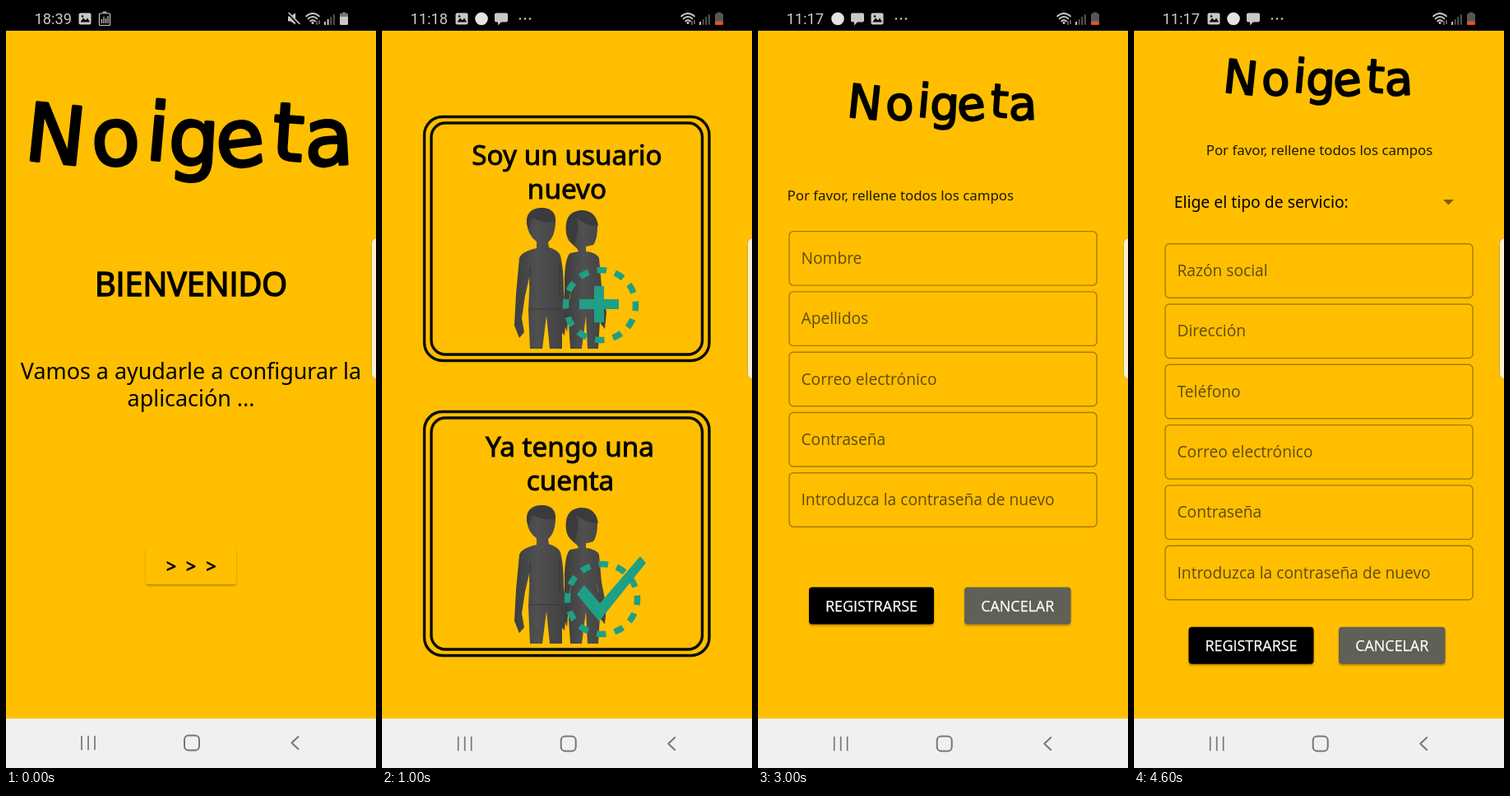
An HTML page that plays this animation: 450 by 925 pixels, repeating every 5 s.

```html
<!DOCTYPE html>
<html lang="es">
<head>
<meta charset="utf-8">
<title>Noigeta</title>
<style>
  html, body { margin: 0; width: 100%; height: 100%; overflow: hidden; background: #ffbf00; }
  svg { display: block; width: 100%; height: 100%; }
  text { font-family: "Noto Sans", "Open Sans", sans-serif; }
  .open { font-family: "Open Sans", "Noto Sans", sans-serif; }
  .clock { font-family: Roboto, "Open Sans", sans-serif; font-size: 18.3px; fill: #c8c8c8; }
  .logo { font-family: "DejaVu Sans", sans-serif; font-size: 97px; stroke: #000; stroke-width: 3.5px; stroke-linejoin: round; }
  .mid { text-anchor: middle; }
  .medium { stroke: #000; stroke-width: .9px; }
  .heavy { stroke: #000; stroke-width: 1.6px; }
  .label { stroke: #fff; stroke-width: .25px; }
  .hint { font-size: 19.2px; fill: #5f4a0c; }
  .line { fill: none; stroke-linecap: round; stroke-linejoin: round; }
</style>
</head>
<body>
<svg id="stage" viewBox="0 0 450 925" xmlns="http://www.w3.org/2000/svg">
  <defs>
    <filter id="drop" x="-10%" y="-20%" width="120%" height="150%">
      <feDropShadow dx="0" dy="1.8" stdDeviation="1.3" flood-color="#3c2c00" flood-opacity=".38"/>
    </filter>
    <linearGradient id="body" x2="1">
      <stop stop-color="#3d3d3d"/><stop offset=".45" stop-color="#505050"/><stop offset="1" stop-color="#404040"/>
    </linearGradient>
  </defs>
  <rect width="450" height="925" fill="#ffbf00"/>
  <rect width="450" height="30"/>
  <rect y="865" width="450" height="60" fill="#f0f0f0"/>
</svg>
<script>
const stage = document.getElementById('stage');
const SCENE_MS = 1000;

const at = (x, y, body, extra = '') => `<g transform="translate(${x} ${y}) ${extra}">${body}</g>`;
const path = (d, fill) => `<path d="${d}" fill="${fill}"/>`;
const line = (d, color, width) => `<path class="line" d="${d}" stroke="${color}" stroke-width="${width}"/>`;
const oval = (x, y, rx, ry, fill) => `<ellipse cx="${x}" cy="${y}" rx="${rx}" ry="${ry}" fill="${fill}"/>`;
const box = (x, y, w, h, r, fill, extra = '') =>
  `<rect x="${x}" y="${y}" width="${w}" height="${h}" rx="${r}" fill="${fill}" ${extra}/>`;
const text = (s, x, y, size, cls = '', fill = '#000') =>
  `<text class="${cls}" x="${x}" y="${y}" style="font-size:${size}px" fill="${fill}">${s}</text>`;

// Status bar
const GREY = '#c8c8c8';
const icons = {
  picture: box(-7.5, -7, 15, 14, 2, GREY) + path('M-5.5 4L-2-1L1 2L3 -1L6 4Z', '#000') + oval(-3, -3, 1.3, 1.3, '#000'),
  chart: box(-6.5, -6.5, 13, 14.5, 1, 'none', `stroke="${GREY}" stroke-width="1.2"`) +
    line('M-3.5 5V1M-1 5V-2M1.5 5V0M4 5V-3M-2 -8H2', GREY, 1.3),
  disc: oval(0, 0, 7.8, 7.8, '#e4e4e4'),
  chat: path('M-6 -7H6Q8 -7 8 -5V2Q8 4 6 4H0L-4 8V4H-6Q-8 4 -8 2V-5Q-8 -7 -6 -7Z', GREY),
  dots: [-6, 0, 6].map(x => oval(x, 0, 1.3, 1.3, GREY)).join(''),
  download: line('M0 -7V2M-4 -1L0 3L4 -1M-5 7H5', GREY, 2),
  mute: path('M-7 -3H-4L2 -7V7L-4 3H-7Z', GREY) + line('M-7 -7L6 7', '#000', 3) + line('M-6 -7L7 6', GREY, 1.6),
  wifi: line('M-8 -3Q0 -10 8 -3M-5.5 0Q0 -5 5.5 0M-3 3Q0 .5 3 3', GREY, 1.7) + oval(0, 5, 1.5, 1.5, GREY) +
    line('M5 3V7M8 2V6', '#999', 1.2),
};

function signal(x, strength) {
  return [0, 1, 2, 3].map(i =>
    box(x + i * 3.6, 19 - i * 3, 2, 4 + i * 3, .5, i < strength ? GREY : '#555')).join('');
}

function statusBar(time, left, x, full) {
  const battery = box(x + 33, 9, 10, 14, 1.5, full ? GREY : '#565656') + box(x + 36, 7.5, 4, 2, 0, full ? '#777' : '#565656') +
    (full ? box(x + 33, 9, 10, 4, 1, '#777') : box(x + 33, 18.5, 10, 4.5, 1, '#d9532c'));
  return `<text class="clock" x="${time.length < 5 ? 32.5 : 34.5}" y="22">${time}</text>` +
    left.map(([name, cx]) => at(cx, 15.5, icons[name])).join('') +
    at(x, 15.5, icons.wifi) + signal(x + 14, full ? 2 : 1) + battery;
}

function navBar(dx, dy) {
  return at(dx, dy,
    line('M92 886.5V902.5M100 886.5V902.5M108 886.5V902.5', '#777', 1.7) +
    box(217, 885.5, 18, 18, 5, 'none', 'stroke="#777" stroke-width="2"') +
    line('M355.5 887L347.5 894.5L355.5 902', '#777', 2));
}

// Shared parts
function logo() {
  const xs = [57, 135, 182, 227, 288, 341, 394];
  const ys = [190, 193, 187, 193, 194, 187, 193];
  const tilt = [6, -3, 5, 3, -7, 4, -3];
  return [...'Noigeta'].map((c, i) =>
    `<text class="logo mid" transform="translate(${xs[i]} ${ys[i]}) rotate(${tilt[i]})">${c}</text>`).join('');
}

function frame(x, y, w, h, gapX, gapY, width) {
  const stroke = `stroke="#0c0c00" stroke-width="${width}"`;
  return box(x, y, w, h, 22, 'none', stroke) +
    box(x + gapX, y + gapY, w - 2 * gapX, h - 2 * gapY, 17, 'none', stroke);
}

function button(label, x, y, w, fill) {
  return box(x, y, w, 45, 4, fill, 'filter="url(#drop)"') +
    text(label, x + w / 2, y + 29.5, 17.9, 'open mid label', '#fff');
}

function fields(labels, top) {
  return labels.map((label, i) => {
    const y = top + i * 73.3;
    return box(38, y, 374, 65.5, 5, 'none', 'stroke="#a67c00" stroke-width="1.4"') +
      `<text class="open hint" x="52.5" y="${y + 39.3}">${label}</text>`;
  }).join('');
}

// Grey couple
function couple() {
  const man = 'M188 286Q177 278 176 263C175 250 184 245 194 245Q212 245 211 264Q210 280 202 287L203 293Q214 296 217 303' +
    'Q221 320 221 344L224 378L222 400L217 394L216 366L219 380V416H204L200 376L195 416H180L178 370' +
    'L180 326L174 352L170 379L173 396L167 403L161 388L163 350L167 306Q170 298 188 294Z';
  const woman = 'M237 294Q223 284 224 267Q225 250 241 249Q259 249 262 268Q262 283 257 290L248 292V298Q261 299 264 306' +
    'L267 340L273 372L271 392L266 386L263 350L260 338L266 366L263 416H250L248 376L243 416H229L226 370L231 338L228 354' +
    'L225 396L222 386L222 330Q223 304 229 300L239 298Z';
  const cap = 'M176 265Q175 246 195 245Q212 246 211 262Q198 265 183 257Q180 262 179 270Z';
  const hair = 'M224 276Q221 250 241 248Q260 247 263 267Q247 267 237 257Q240 275 234 290Q226 287 224 276Z';
  return path(man, 'url(#body)') + path(woman, 'url(#body)') + path(cap, '#3b3b3b') + path(hair, '#3b3b3b') +
    line('M180 368H217M180 317V340M216 315V350', '#393939', 1.2);
}

const TEAL = '#1e9f86';
const ring = (x, y) => `<circle cx="${x}" cy="${y}" r="42.5" fill="none" stroke="${TEAL}" stroke-width="7.5"
  pathLength="120" stroke-dasharray="5.2 4.8" transform="rotate(-6 ${x} ${y})"/>`;

// Cartoon figures
function face(x, y, r, skin, smile = '#a33b2d') {
  return oval(x, y, r * .92, r, skin) + oval(x - r * .92, y + 2, r * .2, r * .25, skin) + oval(x + r * .92, y + 2, r * .2, r * .25, skin) +
    oval(x - r * .38, y, r * .12, r * .16, '#2a1a14') + oval(x + r * .38, y, r * .12, r * .16, '#2a1a14') +
    line(`M${x - r * .35} ${y + r * .45}Q${x} ${y + r * .85} ${x + r * .35} ${y + r * .45}`, smile, 1.3);
}

const fringe = (x, y, r, color) => path(
  `M${x - r} ${y}Q${x - r * 1.25} ${y - r * 1.25} ${x} ${y - r * 1.2}Q${x + r * 1.25} ${y - r * 1.2} ${x + r} ${y}` +
  `Q${x + r * .7} ${y - r * .6} ${x + r * .1} ${y - r * .55}Q${x - r * .7} ${y - r * .6} ${x - r} ${y}Z`, color);

function pet(x, y, r, fur, muzzle) {
  return oval(x - r * .85, y - r * .3, r * .35, r * .65, fur) + oval(x + r * .85, y - r * .3, r * .35, r * .65, fur) +
    oval(x, y, r, r * .9, fur) + oval(x, y + r * .4, r * .5, r * .4, muzzle) +
    oval(x - r * .4, y - r * .2, 1.2, 1.5, '#222') + oval(x + r * .4, y - r * .2, 1.2, 1.5, '#222') +
    oval(x, y + r * .25, 1.6, 1.1, '#222');
}

function family() {
  const tan = '#f9c79b', brown = '#a9683c';
  const father = line('M156 312L151 321L160 334', tan, 5) +
    path('M159 338H195V374H180L178 350L174 374H160Z', '#6478a8') +
    path('M164 304H186Q193 307 193 340H160L161 322L148 318Q150 306 164 304Z', '#69bd83') +
    oval(167, 375, 9, 3.5, '#7b3d1d') + oval(189, 375, 8, 3.5, '#7b3d1d') +
    face(174, 288, 16.5, tan) + fringe(174, 285, 18, '#7c4319') + path('M167 295Q175 301 182 294Q177 305 170 300Z', '#b3262c');
  const mother = oval(229, 290, 11, 14, '#2d2d38') + oval(252, 298, 10, 11, '#2d2d38') +
    path('M222 332H248L244 377H224Z', '#3c4a69') + path('M228 307H252Q261 311 258 334H222Z', '#32afe0') +
    face(238, 292, 14, brown) + fringe(238, 290, 15, '#2d2d38') +
    line('M253 319L240 326L229 324', brown, 5) + oval(232, 379, 11, 3, '#d52a2a') + oval(237, 348, 7, 9, '#9063d3');
  const girl = oval(209, 315, 18, 15, '#f1893c') + path('M198 330H221L225 364H194Z', '#ee4b98') +
    line('M202 366V376M214 366V376', tan, 5) + oval(200, 378, 7, 3.5, '#dff0a0') + oval(214, 378, 7, 3.5, '#8ed8b0') +
    face(209, 317, 13, tan) + fringe(209, 314, 15, '#f1893c');
  const cat = path('M181 327L177 321L187 324ZM192 324L200 321L198 332Z', '#fff') + oval(208, 353, 12, 9, '#fff') +
    oval(225, 363, 7, 9, '#fff') + pet(188, 332, 9, '#fff', '#f6d9d9') + line('M198 344L216 347', tan, 5);
  const son = path('M270 339H287L292 361H266Z', '#df2934') + line('M271 349L291 352', '#f6efe8', 5) +
    face(279, 326, 13, brown) + fringe(279, 323, 14.5, '#282025');
  const dog = oval(281, 370, 18, 12, '#c67a2e') + oval(259, 366, 11, 16, '#d08636') +
    line('M254 369V380M266 369V380M288 379H299', '#c67a2e', 6) + pet(256, 346, 11, '#c8772b', '#e7ab67') +
    line('M248 356Q257 361 266 355', '#d6322e', 2.5);
  return father + mother + girl + cat + son + dog;
}

function coat(x, legs, shirt) {
  return line(`M${x - 6} 710L${x - 7} 746M${x + 6} 710V746`, legs, 7) +
    oval(x - 8, 749, 5, 2.8, '#4a2b22') + oval(x + 7, 749, 5, 2.8, '#4a2b22') +
    path(`M${x - 9} 656H${x + 9}Q${x + 16} 659 ${x + 16} 701H${x + 11}V711H${x - 12}V701H${x - 16}Q${x - 16} 659 ${x - 9} 656Z`, '#f6f8f8') +
    path(`M${x - 5} 655H${x + 5}L${x + 2} 682H${x - 2}Z`, shirt) +
    line(`M${x} 682V710M${x - 11} 672V700M${x + 11} 672V700`, '#c9d5d9', 1) +
    box(x + 4, 670, 6, 5, 0, '#7fb4c8') + box(x - 10, 691, 7, 4, 0, '#bfe0e6') + box(x + 4, 691, 7, 4, 0, '#bfe0e6');
}

function vets() {
  const skin = '#f8c393', scrubs = '#20aeb3';
  const nurse = line('M170 704L168 744M181 704L184 744', scrubs, 10) + oval(167, 748, 7, 3, '#31516a') + oval(185, 748, 7, 3, '#31516a') +
    path('M164 655H185Q195 658 196 686L187 692V710H163V690L151 680Q151 658 164 655Z', scrubs) +
    path('M169 654H180L174 664Z', skin) + line('M155 676L166 687M192 677L183 687', skin, 5) +
    box(163, 673, 21, 22, 1, '#85502f') + box(178, 665, 9, 6, 0, '#e8f4f5') +
    face(174, 638, 13, skin) + fringe(174, 635, 13.5, '#8d6034') + oval(158, 651, 4, 6, '#f3e4cc');
  const doctor = coat(211, '#633022', '#2878aa') + face(210, 639, 12.5, skin) + fringe(210, 636, 13, '#4d251a');
  const redhead = oval(244, 646, 13, 18, '#d85b2c') + coat(246, scrubs, '#37b3b6') +
    face(245, 644, 11, skin) + fringe(245, 641, 12, '#d85b2c');
  const elder = oval(278, 627, 9, 5, '#70452f') + coat(277, skin, '#5b3040') + path('M268 704H286L284 720H270Z', '#5b3040') +
    face(277, 643, 11, skin) + fringe(277, 640, 13, '#70452f') +
    `<circle cx="272" cy="643" r="4" fill="none" stroke="#333"/><circle cx="282" cy="643" r="4" fill="none" stroke="#333"/>` +
    oval(290, 660, 9, 10, '#62b345') + line('M284 653L280 656M295 668Q291 676 286 671', '#4d9936', 3);
  const cat = oval(158, 736, 9, 7, '#777a80') + line('M152 738V745M163 739V746', '#777a80', 4) +
    path('M140 723L137 715L147 719ZM152 719L161 716L159 726Z', '#777a80') + pet(149, 728, 9, '#777a80', '#c4c5c7');
  const ferret = oval(231, 745, 14, 6, '#9b8061') + line('M220 746V753M238 746V753M244 746L252 750', '#5d4938', 4) +
    pet(217, 738, 6.5, '#d9cbb5', '#f8f1e4');
  const dog = oval(297, 743, 11, 10, '#b85c28') + line('M288 743V752M299 745V752M308 744L312 739', '#b85c28', 5) +
    pet(287, 726, 11, '#bf5f29', '#eba878');
  return nurse + doctor + redhead + elder + cat + ferret + dog;
}

// Screens
const INFO = [['picture', 97], ['disc', 121], ['chat', 145], ['dots', 174]];
const INFO_SWAPPED = [['disc', 97], ['chat', 121], ['picture', 145], ['dots', 174]];
const NOTICE = 'Por favor, rellene todos los campos';

const welcome = () =>
  statusBar('18:39', [['picture', 96], ['chart', 120], ['mute', 350]], 373, true) + navBar(0, 0) + logo() +
  text('BIENVENIDO', 225, 352, 39.5, 'open mid heavy') +
  text('Vamos a ayudarle a configurar la', 225, 453, 26.9, 'mid') +
  text('aplicación ...', 225, 486, 26.9, 'mid') +
  box(170, 657, 110, 45, 4, '#ffbf00', 'filter="url(#drop)"') +
  [201, 225, 249.5].map(x => text('&gt;', x, 687.5, 21, 'open mid medium')).join('');

const account = () =>
  statusBar('11:18', INFO, 372, false) + navBar(.7, .9) +
  frame(51.5, 134.5, 346.5, 296, 8.5, 7.5, 3.4) + frame(51.5, 492.5, 346.5, 296, 8.5, 7.5, 3.4) +
  text('Soy un usuario', 225, 193, 33.3, 'mid medium') + text('nuevo', 225, 234, 33.3, 'mid medium') +
  text('Ya tengo una', 228.5, 547, 33.3, 'mid medium') + text('cuenta', 229, 588, 33.3, 'mid medium') +
  couple() + at(0, 365.4, couple(), 'scale(1 .982)') +
  ring(266, 363) + path('M258 340H270V356H288V368H270V384H258V368H240V356H258Z', TEAL) +
  ring(268, 720) + path('M246 703L265 725L314 668L321 676L264 747L237 714Z', TEAL);

const kind = () =>
  statusBar('9:47', [['download', 86], ['disc', 109]], 374, false) + navBar(1, .5) +
  frame(56, 176.5, 337, 213, 8.5, 5, 2.8) + frame(56, 552.5, 337, 213, 8.5, 5, 2.8) +
  text('Familia con', 225, 221, 31.3, 'mid medium') + text('mascotas', 225.3, 259, 31.3, 'mid medium') +
  text('Servicios', 224.7, 602, 31.6, 'mid medium') + family() + vets();

const person = () =>
  statusBar('11:17', INFO_SWAPPED, 372, false) + navBar(.7, .9) + at(95, 26.6, logo(), 'scale(.578)') +
  text(NOTICE, 35.5, 236, 16.85, '', '#201800') +
  fields(['Nombre', 'Apellidos', 'Correo electrónico', 'Contraseña', 'Introduzca la contraseña de nuevo'], 273.6) +
  button('REGISTRARSE', 62, 705.5, 152, '#000') + button('CANCELAR', 251, 705.5, 129.5, '#5f6156');

const service = () =>
  statusBar('11:17', INFO, 372, false) + navBar(.7, .9) + at(95, -3.4, logo(), 'scale(.578)') +
  text(NOTICE, 225.5, 181, 16.85, 'mid', '#201800') +
  text('Elige el tipo de servicio:', 48.7, 245, 19.35) + path('M376 235H389L382.5 241.5Z', '#7b5d08') +
  fields(['Razón social', 'Dirección', 'Teléfono', 'Correo electrónico', 'Contraseña', 'Introduzca la contraseña de nuevo'], 288.7) +
  button('REGISTRARSE', 66.5, 753.7, 152, '#000') + button('CANCELAR', 249, 753.7, 129.5, '#5f6156');

const screens = [welcome, account, kind, person, service].map(draw => `<g visibility="hidden">${draw()}</g>`);
stage.insertAdjacentHTML('beforeend', screens.join('') +
  box(444.5, 281.5, 14, 171.5, 7, '#fff0cb', 'stroke="#c9a445" stroke-width="1"'));
const groups = [...stage.children].filter(el => el.hasAttribute('visibility'));

function render(ms) {
  const current = Math.floor(ms / SCENE_MS) % groups.length;
  groups.forEach((g, i) => g.setAttribute('visibility', i === current ? 'visible' : 'hidden'));
}

const start = performance.now();
function tick() {
  render(performance.now() - start);
  requestAnimationFrame(tick);
}
tick();
</script>
</body>
</html>
```
